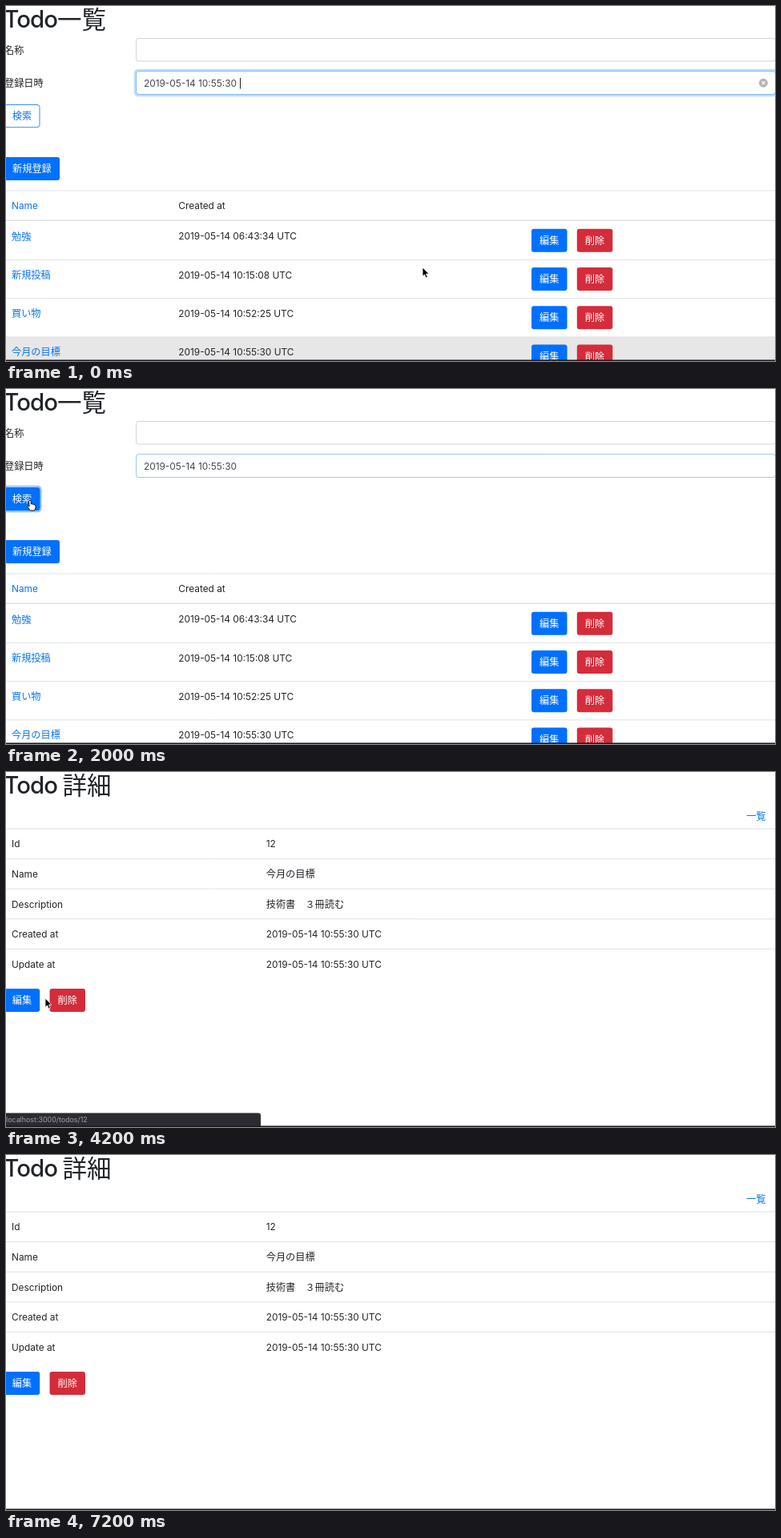
An HTML page for the animation above (7300 ms loop, 960 by 444 pixels).

```html
<!DOCTYPE html>
<html lang="ja">
<head>
<meta charset="utf-8">
<title>Todo</title>
<style>
html, body { margin: 0; width: 100%; height: 100%; overflow: hidden; background: #fff; }
svg { display: block; }
text { font: 11.85px Inter, "Noto Sans CJK JP", "Noto Sans CJK", sans-serif; fill: #212529; white-space: pre; }
.jp text, text.jp { font: 12.2px "Noto Sans CJK JP", "Noto Sans CJK", sans-serif; }
text.link { fill: #0a74f0; }
text.field { fill: #41464b; }
.btn text { fill: #fff; text-anchor: middle; }
.btn.outline text { fill: #0a74f0; }
text.latin-title { font-size: 29.3px; font-weight: 500; letter-spacing: -.03em; text-anchor: end; }
text.jp.title { font-size: 30.5px; }
.line { stroke: #dee2e6; fill: none; }
.blue { fill: #0070ff; }
.red { fill: #d42c3a; }
.hover { fill: #e7e7e7; opacity: 0; }

/* one loop: 7.3s */
.a { animation: 7.3s step-end infinite; }
#form { animation-name: form; }
#list { animation-name: list; }
#result { animation-name: result; }
#detail { animation-name: detail; }
#status { animation-name: status; }
#caret { animation-name: caret; }
#clear { animation-name: clear; }
#hand { animation-name: hand; }
#arrow { animation-name: arrow; }
#hover4 { animation-name: hover4; }
#hover2 { animation-name: hover2; }
#hover1 { animation-name: hover1; }
#hoverR { animation-name: hoverR; }
#ring { animation: ring 7.3s linear infinite; }
#edge { animation: edge 7.3s linear infinite; }
#pressed { animation: pressed 7.3s linear infinite; }
#focus { animation-name: focus; }
#cursor { animation: move 7.3s ease-in-out infinite; }

@keyframes form { 0% { opacity: 1 } 56.85%, 100% { opacity: 0 } }
@keyframes list { 0% { opacity: 1 } 34.93%, 100% { opacity: 0 } }
@keyframes result { 0% { opacity: 0 } 34.93% { opacity: 1 } 56.85%, 100% { opacity: 0 } }
@keyframes detail { 0% { opacity: 0 } 56.85%, 100% { opacity: 1 } }
@keyframes status { 0% { opacity: 0 } 56.85% { opacity: 1 } 68.5%, 100% { opacity: 0 } }
@keyframes caret {
  0% { opacity: 1 } 3.42% { opacity: 0 } 10.27% { opacity: 1 } 17.12% { opacity: 0 }
  23.97% { opacity: 1 } 25.34%, 100% { opacity: 0 }
}
@keyframes clear { 0% { opacity: 1 } 25.34%, 100% { opacity: 0 } }
@keyframes ring { 0%, 25.34% { opacity: 1 } 27.4%, 100% { opacity: 0 } }
@keyframes edge { 0%, 25.34% { opacity: 1 } 30.14%, 100% { opacity: 0 } }
@keyframes focus { 0% { opacity: 0 } 25.34% { opacity: 1 } 34.93%, 100% { opacity: 0 } }
@keyframes pressed {
  0%, 19.18% { opacity: 0 } 21.2%, 34.92% { opacity: 1 } 34.93%, 44.52% { opacity: 0 }
  45.5%, 46% { opacity: 1 } 48%, 100% { opacity: 0 }
}
@keyframes hand {
  0% { opacity: 0 } 19.18% { opacity: 1 } 34.93% { opacity: 0 } 44.52% { opacity: 1 }
  46.58% { opacity: 0 } 50.68% { opacity: 1 } 56.85%, 100% { opacity: 0 }
}
@keyframes arrow {
  0% { opacity: 1 } 19.18% { opacity: 0 } 34.93% { opacity: 1 } 44.52% { opacity: 0 }
  46.58% { opacity: 1 } 50.68% { opacity: 0 } 56.85%, 100% { opacity: 1 }
}
@keyframes hover4 { 0% { opacity: 1 } .68%, 100% { opacity: 0 } }
@keyframes hover2 { 0% { opacity: 0 } .68% { opacity: 1 } 2.05%, 100% { opacity: 0 } }
@keyframes hover1 { 0% { opacity: 0 } 2.05% { opacity: 1 } 4.79%, 100% { opacity: 0 } }
@keyframes hoverR { 0% { opacity: 0 } 50% { opacity: 1 } 56.85%, 100% { opacity: 0 } }
@keyframes move {
  0% { transform: translate(520px, 327px) }
  9.59%, 12.33% { transform: translate(156px, 198px) }
  20.55%, 43.84% { transform: translate(30px, 139px) }
  52.05%, 61.64% { transform: translate(49px, 283px) }
  69.86%, 100% { transform: translate(60px, 460px) }
}
</style>
</head>
<body>
<svg width="960" height="444" viewBox="0 0 960 444">
  <defs>
    <g id="actions" class="btn jp">
      <rect class="blue" width="44.5" height="29" rx="3"/>
      <text x="22.3" y="19">編集</text>
      <rect class="red" x="56.8" width="44.5" height="29" rx="3"/>
      <text x="79" y="19">削除</text>
    </g>
  </defs>

  <g id="form" class="a">
    <text class="latin-title" x="64" y="27">Todo</text>
    <text class="jp title" x="64" y="27.5">一覧</text>
    <text class="jp" x="-2" y="59.5">名称</text>
    <text class="jp" x="-2" y="101">登録日時</text>
    <g fill="#fff" stroke="#ced4da">
      <rect x="162.5" y="40.5" width="798" height="28.5" rx="3"/>
      <rect x="162.5" y="81.5" width="798" height="29" rx="3"/>
    </g>
    <rect id="edge" x="162.5" y="81.5" width="798" height="29" rx="3" fill="none" stroke="#80bdff"/>
    <rect id="ring" x="160.9" y="79.9" width="801.2" height="32.2" rx="4" fill="none" stroke="#007bff" stroke-opacity=".25" stroke-width="2.4"/>

    <g class="btn outline jp">
      <rect x="-2" y="123.5" width="44" height="28.2" rx="3" fill="#fff" stroke="#3d8fe0"/>
      <text x="20" y="142.3">検索</text>
    </g>
    <g id="pressed" class="btn jp">
      <rect id="focus" class="a" x="-3.5" y="121.8" width="47" height="31.4" rx="4" fill="none" stroke="#007bff" stroke-opacity=".45" stroke-width="2"/>
      <rect class="blue" x="-2.3" y="123" width="44.6" height="29" rx="3"/>
      <text x="20" y="142.3">検索</text>
    </g>
    <g class="btn jp">
      <rect class="blue" x="-2.3" y="189" width="69.3" height="29" rx="3"/>
      <text x="32.4" y="208.3">新規登録</text>
    </g>
    <text class="link" x="7" y="254.3">Name</text>
    <path class="line" d="M0 231H960"/>
    <path class="line" d="M0 268.3H960" stroke-width="1.6"/>
  </g>

  <g id="list" class="a">
    <text class="field" x="172" y="100.5">2019-05-14 10:55:30</text>
    <path id="caret" class="a" d="M292.5 90V103.500" stroke="#222" stroke-width="1"/>
    <g id="clear" class="a">
      <circle cx="945.5" cy="96.2" r="5.5" fill="#b4b4b4"/>
      <path d="M943.500 94.200l4 4m0-4l-4 4" stroke="#fff" stroke-width="1.2"/>
    </g>
    <text x="215.3" y="254.3">Created at</text>
    <rect id="hover1" class="hover a" y="269" width="960" height="48"/>
    <rect id="hover2" class="hover a" y="317.300" width="960" height="48"/>
    <rect id="hover4" class="hover a" y="413.900" width="960" height="31"/>
    <path class="line" d="M0 317.300H960M0 365.600H960M0 413.900H960"/>
    <text class="jp link" x="7" y="292.500">勉強</text>
    <text class="jp link" x="7" y="340.800">新規投稿</text>
    <text class="jp link" x="7" y="389.100">買い物</text>
    <text class="jp link" x="7" y="437.400">今月の目標</text>
    <text x="215.300" y="292.300">2019-05-14 06:43:34 UTC</text>
    <text x="215.300" y="340.600">2019-05-14 10:15:08 UTC</text>
    <text x="215.300" y="388.900">2019-05-14 10:52:25 UTC</text>
    <text x="215.300" y="437.200">2019-05-14 10:55:30 UTC</text>
    <use href="#actions" x="656" y="278.700"/>
    <use href="#actions" x="656" y="327"/>
    <use href="#actions" x="656" y="375.300"/>
    <use href="#actions" x="656" y="423.600"/>
  </g>

  <g id="result" class="a">
    <text class="field" x="172" y="100.5">2019-05-14 10:55:30 UTC</text>
    <text x="216.8" y="254.3">Created at</text>
    <rect id="hoverR" class="hover a" y="269" width="960" height="48"/>
    <text class="jp link" x="7" y="292.5">今月の目標</text>
    <text x="216.8" y="292.3">2019-05-14 10:55:30 UTC</text>
    <use href="#actions" x="654.7" y="278.7"/>
  </g>

  <g id="detail" class="a">
    <text class="latin-title" x="64" y="27">Todo</text>
    <text class="jp title" x="70.5" y="27.5">詳細</text>
    <text class="jp link" x="924.3" y="60">一覧</text>
    <path class="line" d="M0 71H960M0 108.600H960M0 146.200H960M0 183.800H960M0 221.400H960"/>
    <text x="7" y="94.4">Id</text>
    <text x="7" y="132">Name</text>
    <text x="7" y="169.6">Description</text>
    <text x="7" y="207.2">Created at</text>
    <text x="7" y="244.8">Update at</text>
    <text x="324.7" y="94.4">12</text>
    <text class="jp" x="324.7" y="132.300">今月の目標</text>
    <text class="jp" x="324.7" y="169.900">技術書　３冊読む</text>
    <text x="324.7" y="207.2">2019-05-14 10:55:30 UTC</text>
    <text x="324.7" y="244.8">2019-05-14 10:55:30 UTC</text>
    <use href="#actions" x="-2.3" y="271"/>
    <g id="status" class="a">
      <path d="M0 426.500H315q3 0 3 3V444H0z" fill="#2b2c33"/>
      <text x="0" y="438.300" style="font-size:8.9px;fill:#a0a1a6">localhost:3000/todos/12</text>
    </g>
  </g>

  <g id="cursor" stroke-linejoin="round">
    <path id="arrow" class="a" d="M0 0V11.200L2.500 8.900L4.300 13L6.300 12.200L4.500 8.100H8Z" fill="#000" stroke="#fff" stroke-width=".8"/>
    <path id="hand" class="a" d="M-1.500 1.200Q0-.8 1.200 1.200V5Q2.500 4 3.500 5.300Q4.700 4.600 5.400 6Q6.800 5.600 7 7.200V9.500L5.600 13H.2L-2.800 8.800Q-3.800 7-2.500 6.800L-1 8.200Z" fill="#fff" stroke="#111" stroke-width="1"/>
  </g>
  <rect y="442.500" width="960" height="1.500" fill="#1c191c"/>
</svg>
</body>
</html>
```
